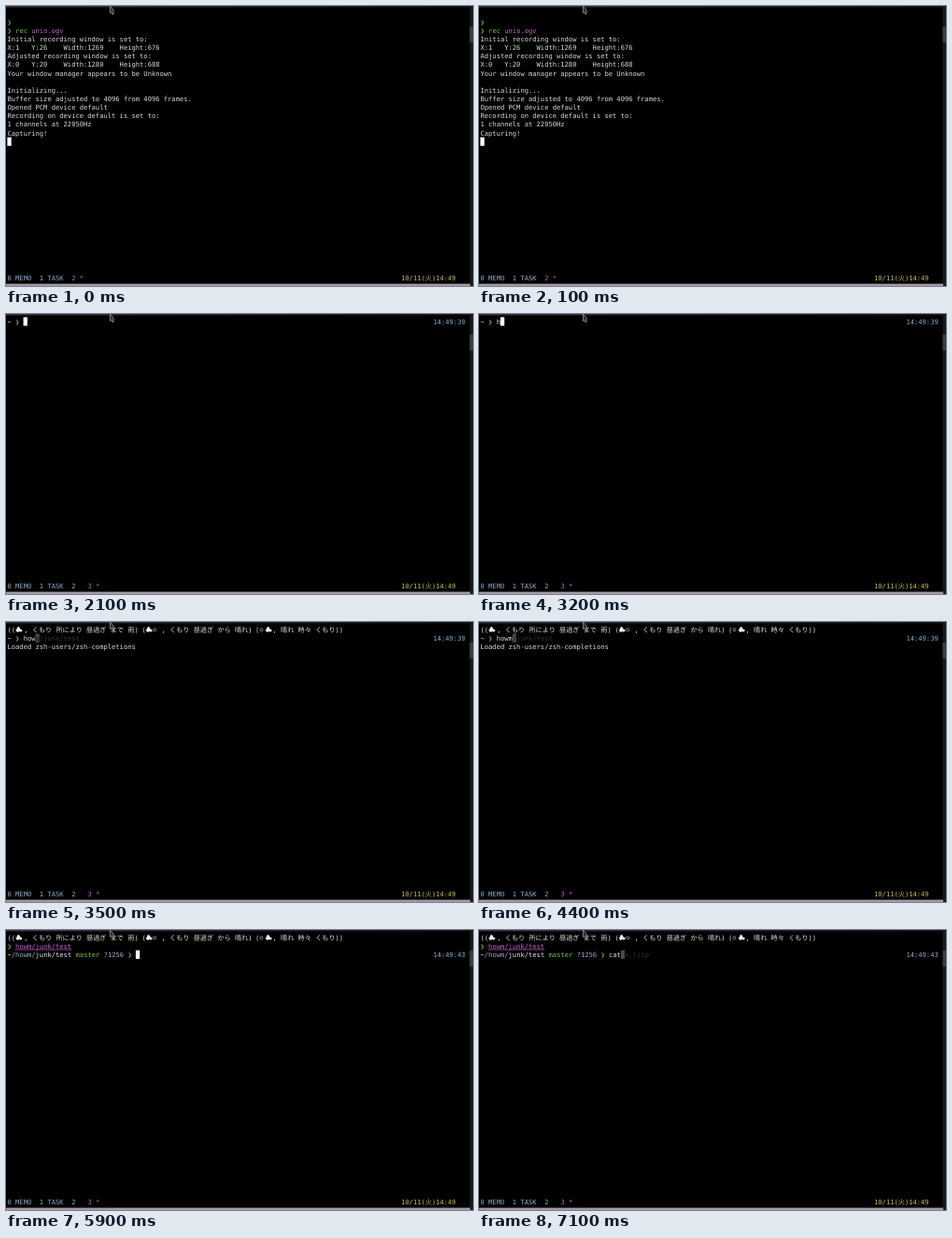
Write an HTML page that moves like this. It is 500 by 300 pixels and loops after 8 s.

```html
<!DOCTYPE html>
<html lang="ja">
<head>
<meta charset="utf-8">
<title>Terminal</title>
<style>
html, body { margin: 0; width: 100%; height: 100%; overflow: hidden; background: #000; }
svg { display: block; width: 500px; height: 300px; }
text {
  font: 7.137px "DejaVu Sans Mono", "Noto Sans CJK JP", "Noto Sans CJK", monospace;
  white-space: pre; text-rendering: geometricPrecision;
}
</style>
</head>
<body>
<svg id="stage" viewBox="0 0 500 300">
  <linearGradient id="edge">
    <stop stop-color="#3b3644"/><stop offset="1" stop-color="#17151b"/>
  </linearGradient>
</svg>
<script>
const LOOP = 8000, CELL = 4.297, LEFT = 1.5, ROW = 9.15;
const WHITE = '#dadada', BLUE = '#88acd0', GREEN = '#6cc644', PINK = '#c75fd0',
      YELLOW = '#c8ba52', DIM = '#333', PALE = '#e4e8f4', LILAC = '#a3a8d4';
const stage = document.getElementById('stage');

const colX = col => LEFT + col * CELL;
const textAt = (x, row, str, color = WHITE, attrs = '') =>
  `<text x="${x}" y="${10.5 + row * ROW}" fill="${color}" ${attrs}>${str}</text>`;
const put = (col, row, str, color, attrs) => textAt(colX(col), row, str, color, attrs);
const rect = (x, y, w, h, fill) =>
  `<rect x="${x}" y="${y}" width="${w}" height="${h}" fill="${fill}"/>`;
const cursor = (col, row, fill = '#fff') =>
  rect(colX(col) - .1, 3.4 + row * ROW, CELL, 9.2, fill);

// Shows markup from time a until time b
function during(a, b, ...parts) {
  stage.insertAdjacentHTML('beforeend',
    `<g data-from="${a}" data-to="${b}">${parts.join('')}</g>`);
}

const cloud = x => `<path transform="translate(${x} 4.9)" fill="#eee"
  d="M1.4 5.8V4.5L0 4.2L1.6 2.6L2 .8L3.6 0L5 1.5L5.2 2.6L7.4 3.5L7.2 4.8L5.6 5.8L4.4 5L3 5.8Z"/>`;
const sun = x => `<circle cx="${x}" cy="8.4" r="1.5" fill="none" stroke="${WHITE}" stroke-width=".6"/>`;
const weather = [
  put(0, 0, '(('), cloud(10), textAt(19.2, 0, ', くもり 所により 昼過ぎ まで 雨)'),
  textAt(145.4, 0, '('), cloud(149.3), sun(159.3), textAt(166.5, 0, ', くもり 昼過ぎ から 晴れ)'),
  textAt(267, 0, '('), sun(273.4), cloud(277.3), textAt(285.5, 0, ', 晴れ 時々 くもり))')
].join('');

const bold = 'font-weight="bold"';
const clock = (row, time) => put(106.1, row, time, BLUE);
const home = row => put(0, row, '~', PALE, bold) +
  put(2, row, '❯', GREEN) + clock(row, '14:49:39');
const typed = (col, row, str) => put(col, row, str) + cursor(col + str.length, row);
// Typed text followed by a dim completion, the cursor on its first letter
const suggest = (col, row, str, rest) => {
  const end = col + str.length;
  return put(col, row, str) + cursor(end, row, '#484848') + put(end, row, rest[0], '#111') +
    put(end + 1, row, rest.slice(1), DIM);
};
const path = (col, row) => put(col, row, 'howm/junk/test', PINK, 'text-decoration="underline"');

// Window edges and status line
during(0, LOOP,
  rect(0, 0, 497, 1.4, 'url(#edge)'),
  rect(496.5, 0, 3.5, 300, '#19191b'), rect(496.5, 22, 3.5, 17, '#3e3e42'),
  rect(0, 297.6, 497, 2.4, '#a499a5'),
  put(0, 31, '0 MEMO  1 TASK', BLUE),
  put(98.1, 31, '10/11(火)14:49', YELLOW));

const log = [
  'Initial recording window is set to:',
  'X:1   Y:26    Width:1269    Height:676',
  'Adjusted recording window is set to:',
  'X:0   Y:20    Width:1280    Height:688',
  'Your window manager appears to be Unknown',
  '',
  'Initializing...',
  'Buffer size adjusted to 4096 from 4096 frames.',
  'Opened PCM device default',
  'Recording on device default is set to:',
  '1 channels at 22050Hz',
  'Capturing!'
];
during(0, 1700,
  put(0, 1, '❯', GREEN), put(0, 2, '❯', GREEN),
  put(2, 2, 'rec', GREEN), put(6, 2, 'unio.ogv', PINK),
  ...log.map((line, i) => put(0, i + 3, line)),
  cursor(0, 15), put(16, 31, '2 *', PINK));

during(1700, LOOP, put(16, 31, '2', BLUE), put(20, 31, '3 *', PINK));
during(1700, 2000, cursor(0, 0));
during(2000, 3400, home(0));
during(2000, 3200, cursor(4, 0));
during(3200, 3300, typed(4, 0, 'h'));
during(3300, 3400, typed(4, 0, 'ho'));

during(3400, LOOP, weather);
during(3400, 5900, home(1), put(0, 2, 'Loaded zsh-users/zsh-completions'));
during(3400, 3500, typed(4, 1, 'how'));
during(3500, 4100, suggest(4, 1, 'how', 'm/junk/test'));
during(4100, 5100, suggest(4, 1, 'howm', '/junk/test'));
during(5100, 5900, path(4, 1), cursor(18, 1));

during(5900, LOOP,
  put(0, 1, '❯', GREEN), path(2, 1),
  put(0, 2, '~', PALE, bold), put(1, 2, '/howm/', LILAC),
  put(7, 2, 'junk/test', PALE, bold),
  put(17, 2, 'master', GREEN), put(24, 2, '?1256', LILAC), put(30, 2, '❯', GREEN),
  clock(2, '14:49:43'));
during(5900, 6800, cursor(32, 2));
['c', 'ca', 'cat'].forEach((s, i) =>
  during(6800 + i * 100, 6900 + i * 100, typed(32, 2, s)));
during(7100, LOOP, suggest(32, 2, 'cat', ' c.lisp'));

// Mouse pointer
during(0, LOOP, `<path d="M111.4 0V7.6L112.9 6.4L114 9L115.1 8.5V4.2Z"
  fill="#2b2b2b" stroke="#a8a8a8" stroke-width=".7"/>`);

const groups = stage.querySelectorAll('g');
function frame() {
  const t = performance.now() % LOOP;
  for (const g of groups)
    g.style.display = t >= g.dataset.from && t < g.dataset.to ? '' : 'none';
  requestAnimationFrame(frame);
}
frame();
</script>
</body>
</html>
```
